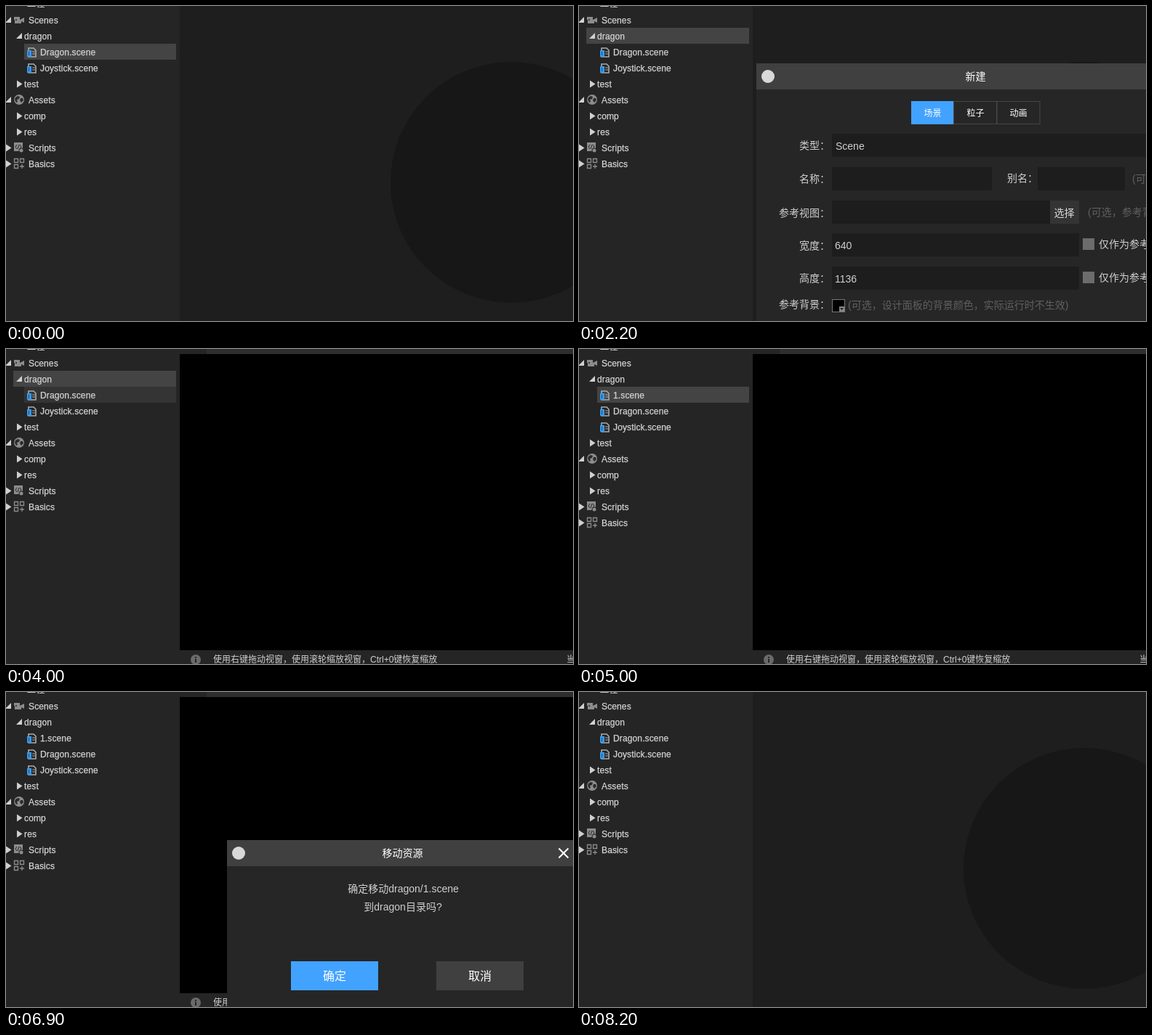
Animation of 780x434 px, one loop 9 s. Source, as an HTML page:

```html
<!DOCTYPE html>
<html lang="zh">
<head>
<meta charset="utf-8">
<title>Scene editor</title>
<style>
html, body { margin: 0; width: 100%; height: 100%; overflow: hidden; background: #1e1e1e; }
svg { display: block; width: 780px; height: 434px; }
text { font-family: "Liberation Sans", "Noto Sans CJK SC", "Noto Sans CJK", sans-serif; white-space: pre; }
.menu text { font-family: "Noto Sans", "Noto Sans CJK SC", "Noto Sans CJK", sans-serif; }
.tree text { letter-spacing: .13px; stroke: #d4d4d4; stroke-width: .25px; }
</style>
</head>
<body>
<svg id="stage" viewBox="0 0 780 434">
  <g id="ui"></g>
  <text id="toast" x="186" font-size="14" fill="#00cc00">工程刷新完毕</text>
</svg>
<script>
const LOOP = 9000;
const ui = document.getElementById('ui');
const toast = document.getElementById('toast');

// Each step: time in ms and the state it changes.
const steps = [
  [0, { sel: 'Dragon.scene' }],
  [500, { sel: 'dragon' }],
  [600, { menu: 'none' }],
  [900, { menu: '删除' }],
  [1000, { menu: '新建目录' }],
  [1100, { menu: '打开所在目录' }],
  [1300, { menu: '新建目录' }],
  [1400, { menu: '新建' }],
  [1600, { sub: 'none' }],
  [1700, { sub: '场景' }],
  [2200, { menu: '', sub: '', create: true }],
  [2800, { caret: 353 }],
  [3200, { name: '1', caret: 361 }],
  [3500, { create: false }],
  [3600, { editor: true }],
  [3800, { hover: 'Assets' }],
  [3900, { hover: 'test' }],
  [4000, { hover: 'Dragon.scene' }],
  [4200, { hover: '' }],
  [4600, { added: true }],
  [4900, { hover: '1.scene' }],
  [5000, { hover: '', sel: '1.scene' }],
  [5600, { hover: 'dragon' }],
  [6000, { hover: '', sel: '', move: true }],
  [6900, { okHover: true }],
  [7200, { move: false, editor: false, added: false }]
];

const rect = (x, y, w, h, fill, more = '') =>
  `<rect x="${x}" y="${y}" width="${w}" height="${h}" fill="${fill}" ${more}/>`;
const circle = (x, y, r, fill) => `<circle cx="${x}" cy="${y}" r="${r}" fill="${fill}"/>`;
const path = (d, fill, more = '') => `<path d="${d}" fill="${fill}" ${more}/>`;
// Text placed by its vertical middle.
const text = (s, x, mid, size, fill, anchor = 'start') =>
  `<text x="${x}" y="${mid + size * .36}" font-size="${size}" fill="${fill}" text-anchor="${anchor}">${s}</text>`;

const GREY = '#8c8c8c';
const icons = {
  camera: path('M11 7h8v4l6-3v7l-4-2v3h-9v-5h-1z', GREY) + circle(14, 11, 1, '#252525'),
  globe: circle(18, 11, 7, GREY) +
    path('M13 8l3-2 3 1-1 3-3 1 1 3-2 1-2-4zM20 9l3 0 1 3-3 3-2-3z', '#2b2b2b'),
  script: rect(11, 4, 12, 12, GREY) +
    path('M15 7l-2 3 2 3M18 7l-2 6M19 7l2 3-2 3', 'none', 'stroke="#252525"') +
    circle(21, 15, 3.5, '#252525') + circle(21, 15, 2.5, GREY),
  blocks: path('M11.5 4.5h5v5h-5zM19.5 4.5h5v5h-5zM11.5 12.5h5v5h-5zM22 12v6M19 15h6', 'none',
    `stroke="${GREY}" stroke-width="1.3"`),
  file: path('M31 6h7l3 3v9h-10z', 'none', 'stroke="#aaa" stroke-width="1.6"') +
    path('M36 11h4M36 14h4', 'none', 'stroke="#aaa"') +
    rect(29, 9, 6, 9, '#3a97ec') + rect(31, 11, 1, 5, '#1d4c78')
};

// level, label, arrow, icon
const rows = [
  [0, 'Scenes', 'open', 'camera'],
  [1, 'dragon', 'open'],
  [2, '1.scene', '', 'file'],
  [2, 'Dragon.scene', '', 'file'],
  [2, 'Joystick.scene', '', 'file'],
  [1, 'test', 'shut'],
  [0, 'Assets', 'open', 'globe'],
  [1, 'comp', 'shut'],
  [1, 'res', 'shut'],
  [0, 'Scripts', 'shut', 'script'],
  [0, 'Basics', 'shut', 'blocks']
];

function tree(s) {
  const shown = rows.filter(r => s.added || r[1] !== '1.scene');
  const list = shown.map(([level, label, arrow, icon], i) => {
    const left = [0, 10, 25][level], ax = level ? 15 : 0;
    const back = label === s.sel ? '#444444' : label === s.hover ? '#343434' : '';
    const mark = { open: `M${ax + 7} 7v8h-8z`, shut: `M${ax} 6.5l7.5 5-7.5 5z` }[arrow];
    return `<g transform="translate(0 ${8 + 22 * i})">` +
      (back ? rect(left, 0, 234 - left, 22, back) : '') +
      (mark ? path(mark, '#d0d0d0') : '') + (icons[icon] || '') +
      text(label, [31, 25, 47][level], 11.6, 12, '#d4d4d4') + '</g>';
  });
  return `<g class="tree">${rect(0, 0, 239, 434, '#252525')}${text('工程', 29, -3, 12, '#d4d4d4')}${list.join('')}</g>`;
}

const menuItems = ['打开', '重命名', 'Clone', '设置默认属性', '删除', '忽略', '忽略列表',
  '新建', '新建目录', '打开所在目录', '查找引用'];

function menuBox(x, y, w, h, items, midOf, hot) {
  return rect(x + 2, y + 2, w, h, '#000', 'opacity=".45"') +
    rect(x + .5, y + .5, w - 1, h - 1, '#fff', 'stroke="#a6a6a6"') +
    items.map((label, i) =>
      (label === hot ? rect(x + 1, midOf(i) - 12, w - 2, 24, '#ebebeb') : '') +
      text(label, x + 27, midOf(i) + .5, label === 'Clone' ? 12.5 : 12, '#111')).join('');
}

function menus(s) {
  let out = menuBox(78, 39, 154, 281, menuItems, i => 54 + 24 * i + (i > 6 ? 11 : 0), s.menu) +
    text('Del', 187, 150.5, 12.5, '#999') + rect(80, 215, 150, 1, '#dcdcdc') +
    path('M219 229l5 4-5 4z', '#444');
  if (s.sub) out += menuBox(228, 218, 106, 80, ['场景', '粒子', '动画'], i => 233 + 24 * i, s.sub);
  return `<g class="menu">${out}</g>`;
}

const dialog = (x, y, title) =>
  rect(x, y, 780 - x, 434 - y, '#262626') + rect(x, y, 780 - x, 36, '#404040') +
  circle(x + 16, y + 18, 9, '#d8d8d8') + text(title, 545.5, y + 18, 14, '#fff', 'middle');

function createDialog(s) {
  const field = (x, y, w) => rect(x, y, w, 32, '#1d1d1d');
  const label = (t, x, y) => text(t, x, y, 14, '#d0d0d0');
  const hint = (t, x, y) => text(t, x, y, 14, '#606060');
  const check = y => rect(693, y, 16, 16, '#6c6c6c') + label('仅作为参考', 715, y + 8);
  const tabs = ['场景', '粒子', '动画'].map((t, i) => {
    const x = 457 + 59 * i;
    return (i ? rect(x - .5, 131.5, 59.5, 31, 'none', 'stroke="#464646"') : rect(x, 131, 59, 32, '#42a2ff')) +
      text(t, x + 29.5, 147.5, 12, '#fff', 'middle');
  });
  return dialog(244, 79, '新建') + tabs.join('') +
    label('类型：', 303, 192) + field(348, 176, 432) + label('Scene', 353, 193) +
    label('名称：', 303, 238) + field(348, 222, 220) + label(s.name || '', 353, 238) +
    (s.caret ? rect(s.caret, 230, 1, 16, '#d0d0d0') : '') +
    label('别名：', 589, 237) + field(631, 222, 120) + hint('(可选)', 761, 238) +
    label('参考视图：', 275, 284.5) + field(348, 268, 300) + rect(648, 268, 40, 32, '#343434') +
    text('选择', 667.5, 285, 14, '#d8d8d8', 'middle') + hint('(可选，参考背景)', 700, 284) +
    label('宽度：', 303, 330) + field(348, 313, 340) + label('640', 352, 330) + check(320) +
    label('高度：', 303, 374.5) + field(348, 359, 340) + label('1136', 352, 376) + check(366) +
    label('参考背景：', 275, 411) + rect(348.5, 404.5, 17, 17, '#000', 'stroke="#777"') +
    rect(358, 414, 7, 7, '#888') + path('M359 416h5l-2.5 3z', '#222') +
    hint('(可选，设计面板的背景颜色，实际运行时不生效)', 370, 411.5);
}

function moveDialog(s) {
  const button = (t, x, fill) => rect(x, 371, 120, 40, fill) + text(t, x + 60, 391.5, 16, '#fff', 'middle');
  return dialog(304, 204, '移动资源') +
    path('M760.5 215.5l13 13M773.5 215.5l-13 13', 'none', 'stroke="#fff" stroke-width="2"') +
    text('确定移动dragon/1.scene', 546.5, 271, 14, '#d0d0d0', 'middle') +
    text('到dragon目录吗?', 546, 295.5, 14, '#d0d0d0', 'middle') +
    button('确定', 392, s.okHover ? '#42a2ff' : '#3a95e8') + button('取消', 592, '#404040');
}

function workspace(s) {
  if (!s.editor) return rect(239, 0, 541, 434, '#1e1e1e') + circle(695, 243, 166, '#171717');
  return rect(239, 0, 541, 434, '#252525') + rect(276, 0, 504, 7, '#2e2e2e') +
    rect(239, 7, 541, 408, '#000') + circle(261, 428, 7, '#6a6a6a') +
    rect(260, 424, 2, 2, '#252525') + rect(260, 427, 2, 5, '#252525') +
    text('使用右键拖动视窗，使用滚轮缩放视窗，Ctrl+0键恢复缩放', 285, 427.5, 12, '#d0d0d0') +
    text('当前', 771, 428, 12, '#d0d0d0');
}

function draw(s) {
  ui.innerHTML = workspace(s) + tree(s) + (s.menu ? menus(s) : '') +
    (s.create ? createDialog(s) : '') + (s.move ? moveDialog(s) : '');
}

let last = -1;
function frame() {
  const t = performance.now() % LOOP;
  const now = steps.filter(([at]) => at <= t);
  if (now.length !== last) {
    last = now.length;
    draw(Object.assign({}, ...now.map(([, change]) => change)));
  }
  // The notice climbs at an even pace, in tenths of a second.
  const tick = Math.floor((t - 7200) / 100);
  toast.style.display = tick >= 0 && tick < 10 ? '' : 'none';
  toast.setAttribute('y', 173 - 12.75 * (tick - 1));
  requestAnimationFrame(frame);
}
frame();
</script>
</body>
</html>
```
